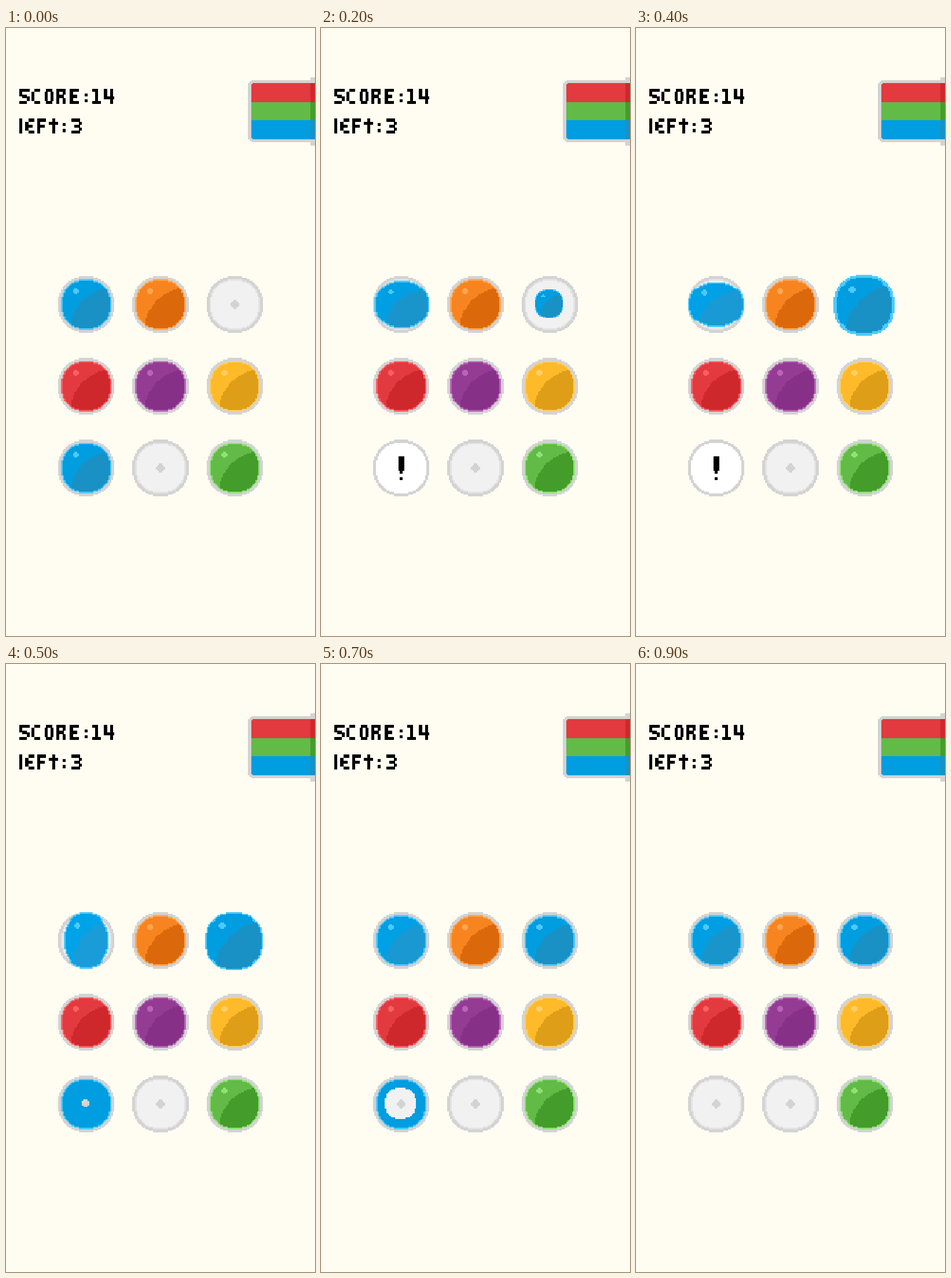
These frames come from a looping animation (534 px wide and 1049 px high, 1000 ms). An HTML page with a canvas:

```html
<!DOCTYPE html>
<html lang="en">
<head>
<meta charset="utf-8">
<title>Colour balls</title>
<style>
  html, body { margin: 0; width: 100%; height: 100%; overflow: hidden; background: #fffdf2; }
  canvas { display: block; width: 100%; height: 100%; image-rendering: pixelated; }
</style>
</head>
<body>
<canvas id="stage" width="208" height="409" role="img" aria-label="SCORE:14 left:3"></canvas>
<script>
const ctx = document.getElementById('stage').getContext('2d');
ctx.imageSmoothingEnabled = false;

const STEP_MS = 100, STEPS = 10;
const SLOT = 38, BALL = 34, RIM = 2;
const GREY = '#d3d3d3';
const COLS = [35, 85, 135], ROWS = [167, 222, 277];

// main, shade, light
const BLUE = ['#009de0', '#1a91c4', '#4ccaff'];
const BLUE_FADED = ['#00a2e8', '#1a9cd8', '#4ccaff'];
const RED = ['#e23a3e', '#cf282c', '#ff5e62'];
const GREEN = ['#62bb47', '#449c2a', '#90e276'];
const ORANGE = ['#f88420', '#db690c', '#ffa64f'];
const PURPLE = ['#943c93', '#873087', '#b964b8'];
const YELLOW = ['#ffba2a', '#df9e18', '#ffcf66'];

// Glyphs as strokes two pixels wide
const GLYPHS = {
  S: 'M7 1H1V5M2 5H5M6 5V8M0 9H5',
  C: 'M6 1H2M1 2V8M2 9H6',
  O: 'M1 1H5M1 2V8M5 2V8M1 9H5',
  R: 'M1 10V1H5V4M1 5H5M5 6V10',
  E: 'M6 1H1V9H6M1 5H5',
  ':': 'M1 3V5M1 7V9',
  1: 'M0 1H3V9M0 9H6',
  4: 'M1 0V6H7M5 0V10',
  l: 'M1 0V10',
  e: 'M6 1H2M1 2V8M1 5H5M2 9H6',
  f: 'M1 10V1H6M1 5H5',
  t: 'M3 0V10M0 3H6',
  3: 'M0 1H6M6 2V4M2 5H6M6 6V8M0 9H6'
};

function rect(c, color, x, y, w, h) {
  c.fillStyle = color;
  c.fillRect(x, y, w, h);
}

// Pixelated, slightly squared circle of diameter d
function disc(c, color, x, y, d, power = 2.25) {
  const r = d / 2;
  for (let row = 0; row < d; row++) {
    const dy = Math.abs(row + 0.5 - r) / r;
    const inset = Math.round(r - r * (1 - dy ** power) ** (1 / power));
    rect(c, color, x + inset, y + row, d - 2 * inset, 1);
  }
}

function mix(a, b, k) {
  const channel = (hex, i) => parseInt(hex.slice(i, i + 2), 16);
  return 'rgb(' + [1, 3, 5].map(i =>
    Math.round(channel(a, i) * (1 - k) + channel(b, i) * k)) + ')';
}

function makeBall([main, shade, light], flat = false, hole = 0) {
  const canvas = document.createElement('canvas');
  canvas.width = canvas.height = BALL;
  const c = canvas.getContext('2d');
  disc(c, main, 1, 1, BALL - 2);
  if (!flat) {
    c.globalCompositeOperation = 'source-atop';
    for (let y = 6; y < BALL; y++) {
      const left = Math.round(35.5 - Math.sqrt(Math.max(0, 29.4 ** 2 - (y + 0.5 - 35) ** 2)));
      rect(c, shade, left, y, BALL, 1);
    }
    rect(c, light, 9, 6, 2, 4);
    rect(c, light, 8, 7, 4, 2);
  }
  c.globalCompositeOperation = 'destination-over';
  disc(c, light, 0, 0, BALL);
  if (hole) {
    c.globalCompositeOperation = 'destination-out';
    const corner = (BALL - 1 - hole) / 2;
    disc(c, '#000', corner, corner, hole);
  }
  return canvas;
}

function drawSlot(x, y) {
  disc(ctx, GREY, x, y, SLOT, 2.2);
  disc(ctx, '#e3e3e3', x + RIM, y + RIM, BALL);
  disc(ctx, '#f1f1f1', x + RIM + 1, y + RIM + 1, BALL - 2);
  for (let i = 0; i < 3; i++) {
    rect(ctx, GREY, x + 18 - i, y + 16 + i, 2 + 2 * i, 6 - 2 * i);
  }
}

function drawBall(sprite, x, y, w = BALL, h = BALL) {
  ctx.drawImage(sprite, x, y, w, h);
}

function drawText(text, xs, y) {
  ctx.strokeStyle = '#000';
  ctx.lineWidth = 2;
  [...text].forEach((ch, i) => {
    ctx.save();
    ctx.translate(xs[i], y);
    ctx.stroke(new Path2D(GLYPHS[ch]));
    ctx.restore();
  });
}

function drawFlag() {
  rect(ctx, GREY, 165, 35, 43, 42);
  rect(ctx, GREY, 164, 36, 1, 40);
  rect(ctx, GREY, 163, 37, 1, 38);
  rect(ctx, GREY, 205, 33, 3, 46);
  [[RED, 37, 50], [GREEN, 50, 62], [BLUE, 62, 75]].forEach(([color, top, bottom]) => {
    rect(ctx, color[0], 165, top, 40, bottom - top);
    rect(ctx, color[1], 205, top, 3, bottom - top);
  });
  rect(ctx, GREY, 165, 37, 1, 1);
  rect(ctx, GREY, 165, 74, 1, 1);
}

// Ball that wobbles: squashed first, then stretched
function drawWobble(step) {
  const [x, y] = [COLS[0], ROWS[0]];
  const poses = {
    1: [2, 2, 35, 33],
    2: [1, 3, 37, 32],
    3: [1, 3, 37, 32],
    4: [0, 4, 38, 30],
    5: [4, 0, 30, 38],
    6: [3, 1, 32, 36]
  };
  const [dx, dy, w, h] = poses[step] || [RIM, RIM, BALL, BALL];
  const fade = step <= 5 ? step / 5 : (11 - step) / 6;
  const colors = BLUE.map((color, i) => mix(color, BLUE_FADED[i], fade));
  drawSlot(x, y);
  drawBall(makeBall(colors), x + dx, y + dy, w, h);
}

// Ball that pops up, overshoots and settles
function drawGrowing(step) {
  const [x, y] = [COLS[2], ROWS[0]];
  const sizes = [0, 8, 19, 30, 41, 39];
  drawSlot(x, y);
  if (step >= sizes.length) {
    drawBall(makeBall(BLUE), x + RIM, y + RIM);
  } else if (step > 0) {
    const size = sizes[step];
    const left = x + Math.floor(18.5 - size / 2);
    const top = y + Math.trunc(19 - size / 2);
    const edge = Math.floor(size / 20);
    const inner = size - 2 * edge;
    disc(ctx, BLUE[2], left, top, size);
    ctx.drawImage(makeBall(BLUE), 1, 1, BALL - 2, BALL - 2, left + edge, top + edge, inner, inner);
  }
}

// Ball that flashes a warning, then opens from the middle
function drawVanishing(step) {
  const [x, y] = [COLS[0], ROWS[2]];
  drawSlot(x, y);
  if (step === 0) {
    drawBall(makeBall(BLUE), x + RIM, y + RIM);
  } else if (step < 5) {
    disc(ctx, step % 2 ? '#f00' : '#fff', x + RIM, y + RIM, BALL);
    rect(ctx, '#000', x + 17, y + 11, 4, 10);
    rect(ctx, '#000', x + 18, y + 21, 2, 2);
    rect(ctx, '#000', x + 18, y + 25, 2, 2);
  } else if (step < 9) {
    drawBall(makeBall(BLUE, true, 5 + 8 * (step - 5)), x + RIM, y + RIM);
  }
}

const still = [
  [ORANGE, 1, 0], [RED, 0, 1], [PURPLE, 1, 1], [YELLOW, 2, 1], [GREEN, 2, 2]
].map(([colors, col, row]) => ({ sprite: makeBall(colors), x: COLS[col], y: ROWS[row] }));

function draw(step) {
  rect(ctx, '#fffdf2', 0, 0, 208, 409);
  drawText('SCORE:14', [9, 17, 26, 34, 43, 53, 58, 66], 41);
  drawText('left:3', [9, 13, 21, 29, 38, 44], 61);
  drawFlag();
  still.forEach(({ sprite, x, y }) => {
    drawSlot(x, y);
    drawBall(sprite, x + RIM, y + RIM);
  });
  drawSlot(COLS[1], ROWS[2]);
  drawWobble(step);
  drawVanishing(step);
  drawGrowing(step);
}

const start = performance.now();
let shown = -1;

function tick() {
  const step = Math.floor((performance.now() - start) / STEP_MS) % STEPS;
  if (step !== shown) draw(shown = step);
  requestAnimationFrame(tick);
}
tick();
</script>
</body>
</html>
```
